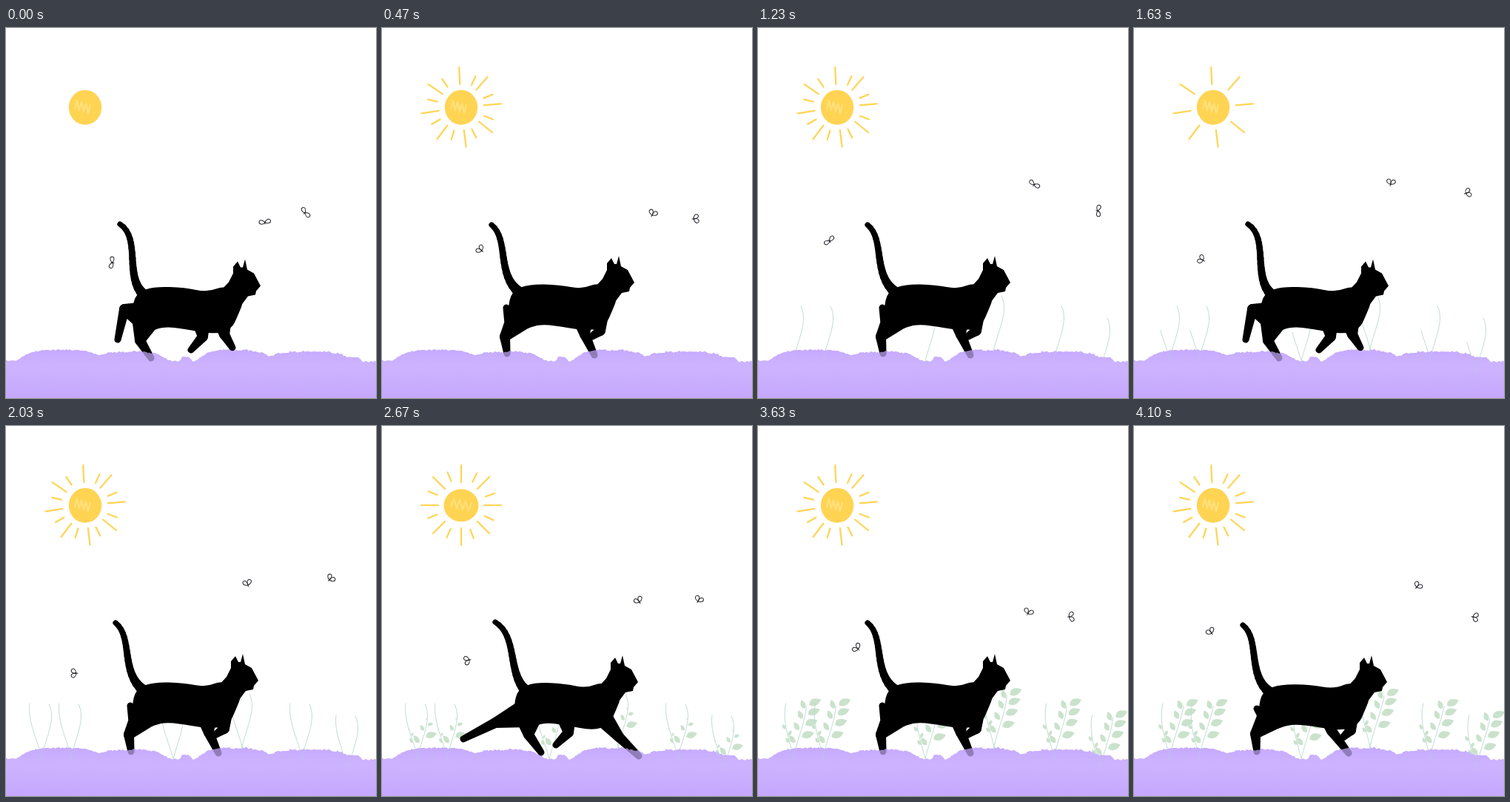
Recreate the animation shown at these times as an HTML page with a canvas. Size 500 by 500 pixels, loop 4.13 s.

```html
<!DOCTYPE html>
<html lang="en">
<head>
<meta charset="utf-8">
<title>Cat on a walk</title>
<style>
html, body { margin: 0; width: 100%; height: 100%; overflow: hidden; background: #fff; }
canvas { display: block; width: 500px; height: 500px; }
</style>
</head>
<body>
<canvas id="stage" width="500" height="500"></canvas>
<script>
const LOOP = 4130, WALK = 792, FLIGHT = 3170, GLOW = 760, FLAP = 308;
const ctx = document.getElementById('stage').getContext('2d');
const clamp = v => Math.max(0, Math.min(1, v));
const ease = v => { v = clamp(v); return v * v * (3 - 2 * v); };
const lerp = (a, b, u) => a + (b - a) * u;
const rad = d => d * Math.PI / 180;
const noise = i => { const s = Math.sin(i * 127.1) * 43758.5453; return s - Math.floor(s); };
const pick = (list, t, period) => list[Math.floor(t % period / period * list.length)];
const bezier = ([a, b, c, d], u) => [0, 1].map(i => {
  const v = 1 - u;
  return v * v * v * a[i] + 3 * v * v * u * b[i] + 3 * v * u * u * c[i] + u * u * u * d[i];
});

// ---------- sun ----------
const sunStates = ['bare', 'long', 'full', 'full', 'full', 'turned', 'full', 'full', 'turned', 'full'];

function drawRays(start, step, inner, outer) {
  for (let i = 0; i < 8; i++) {
    const a = rad(start + step * i), c = Math.cos(a), s = Math.sin(a);
    ctx.beginPath();
    ctx.moveTo(107 + c * inner, 107 + s * inner);
    ctx.lineTo(107 + c * outer, 107 + s * outer);
    ctx.stroke();
  }
}

function drawSun(t) {
  const state = pick(sunStates, t, GLOW), turned = state === 'turned';
  ctx.lineCap = ctx.lineJoin = 'round';
  ctx.fillStyle = ctx.strokeStyle = '#ffd453';
  ctx.lineWidth = 2.2;
  if (turned) {
    drawRays(-90, 45, 31, 54);
    drawRays(-64, 44.5, 35, 48);
  } else if (state !== 'bare') {
    drawRays(-93, 44, 31, 54);
    if (state === 'full') drawRays(-65, 43, 33, 46);
  }
  ctx.beginPath();
  ctx.ellipse(107, 107.3, turned ? 23.5 : 22.2, turned ? 22 : 23.5, 0, 0, 7);
  ctx.fill();
  ctx.strokeStyle = '#ffe07c';
  ctx.lineWidth = 2.2;
  ctx.beginPath();
  for (let i = 0; i < 8; i++) ctx.lineTo(93 + i * (turned ? 4 : 3), 106 + i + (i % 2 ? -9 : 3));
  ctx.stroke();
}

// ---------- ground ----------
// centre, half width and height of each mound
const mounds = [[75, 62, 15], [168, 52, 13], [243, 8, 6], [310, 53, 15], [409, 62, 13], [470, 11, 6]];

function ridge(x) {
  const rise = mounds.map(([c, w, h]) => h * (1 - ((x - c) / w) ** 4));
  return 450.5 - Math.max(0, ...rise) + (noise(x) - .5) * 2 + (noise(x >> 3) - .5) * 2;
}

function makeGround() {
  const cv = document.createElement('canvas');
  cv.width = cv.height = 500;
  const g = cv.getContext('2d');
  const fill = g.createLinearGradient(0, 434, 0, 500);
  fill.addColorStop(0, '#c6aafe');
  fill.addColorStop(.35, '#cdb3ff');
  fill.addColorStop(1, '#c5a8fd');
  g.fillStyle = fill;
  g.beginPath();
  g.moveTo(0, 500);
  for (let x = 0; x <= 500; x += 2) g.lineTo(x, ridge(x));
  g.lineTo(500, 500);
  g.fill();
  return cv;
}
const ground = makeGround();

// ---------- plants ----------
const plants = [[0, 0], [40, 0], [178, 3], [271, -14], [352, 0], [414, 16]];

function drawLeaf([x, y], angle, len) {
  ctx.save();
  ctx.translate(x, y);
  ctx.rotate(rad(angle));
  ctx.beginPath();
  ctx.moveTo(0, 0);
  ctx.lineTo(len * .2, 0);
  ctx.quadraticCurveTo(len * .45, -len * .5, len, 0);
  ctx.quadraticCurveTo(len * .55, len * .4, len * .2, 0);
  ctx.fill();
  ctx.restore();
}

function drawPlant(t) {
  const lean = ease((t - 2700) / 1300);
  const left = [[49, 451], [43, 425], [29 + 4 * lean, 400], [32 + 7 * lean, 375]];
  const right = [[47, 451], [54, 421], [68 - 4 * lean, 396], [58 + 9 * lean, 376 + 3 * lean]];
  const grow = (stem, start, time) => {
    const g = clamp((t - start) / time);
    ctx.beginPath();
    for (let k = 0; g && k <= 20; k++) ctx.lineTo(...bezier(stem, g * k / 20));
    ctx.stroke();
  };
  grow(right, 570, 620);
  grow(left, 1200, 780);
  // leaves sprout from the root up, on alternate sides
  for (let i = 0; i < 8; i++) {
    const side = i % 2, g = ease((t - 2080 - i * 100) / 620);
    if (g) drawLeaf(bezier(right, .24 + i * .107), side ? -18 - i : -130 + 3 * i, g * (side ? 22 : 16));
  }
  for (let i = 0; i < 3; i++) {
    const g = ease((t - 2150 - i * 150) / 620);
    if (g) drawLeaf(bezier(left, .28 + i * .12), i % 2 ? -65 : -125, 10 * g);
  }
}

function drawPlants(t) {
  ctx.strokeStyle = '#b9d8cc';
  ctx.fillStyle = '#cae2cc';
  ctx.lineWidth = .9;
  for (const [dx, dy] of plants) {
    ctx.save();
    ctx.translate(dx, dy);
    drawPlant(t);
    ctx.restore();
  }
}

// ---------- cat ----------
const torso = [
  [178, 354], [200, 346], [240, 347], [270, 353], [294, 343], [320, 360], [310, 385],
  [302, 402], [280, 410], [240, 403], [212, 400], [190, 409], [170, 402], [171, 370]
];
const head = [
  [288, 350], [298, 339], [304, 327], [304, 318], [310, 311], [314, 319], [317, 319], [320, 308],
  [323, 322], [332, 327], [341, 344], [335, 351], [334, 356], [324, 358], [312, 374]
];

// shifts of rump, head and tail tip; each leg is a knee and a paw
const lifted = {
  rump: [0, 3], head: [3, 4.5], tip: [6, -1], bow: 5,
  hind: [[[160, 380], [151, 421]], [[181, 422], [196, 446]]],
  fore: [[[266, 417], [250, 435]], [[295, 414], [306, 432]]]
};
const passing = {
  rump: [0, 0], head: [0, 0], tip: [0, 0], bow: 0,
  hind: [[[172, 394], [168, 378]], [[166, 417], [169, 440]]],
  fore: [[[295, 409], [282, 418]], [[274, 414], [287, 442]]]
};
const bent = {
  rump: [-2, 3], head: [1, 2], tip: [-1, 3], bow: 0,
  hind: [[[174, 392], [166, 382]], [[164, 416], [166, 440]]],
  fore: [[[293, 411], [281, 422]], [[267, 412], [290, 442]]]
};
const stride = {
  rump: [8, 0], head: [5, 2], tip: [5, -1], bow: 7,
  hind: [[[153, 401], [110, 423]], [[198, 417], [215, 441]]],
  fore: [[[252, 414], [235, 431]], [[320, 420], [347, 446]]]
};
const steps = [lifted, bent, stride, lifted, passing, bent, stride, lifted];

const add = (p, d) => [p[0] + d[0], p[1] + d[1]];
const mid = (p, q) => [(p[0] + q[0]) / 2, (p[1] + q[1]) / 2];

function drawBlob(points) {
  const last = points[points.length - 1];
  ctx.beginPath();
  ctx.moveTo(...mid(last, points[0]));
  points.forEach((p, i) => ctx.quadraticCurveTo(...p, ...mid(p, points[(i + 1) % points.length])));
  ctx.fill();
}

// tapered bar with round ends
function drawBone([x, y], r, [x2, y2], r2) {
  const a = Math.atan2(y2 - y, x2 - x);
  const b = Math.acos(Math.max(-1, Math.min(1, (r - r2) / Math.hypot(x2 - x, y2 - y))));
  ctx.beginPath();
  ctx.arc(x, y, r, a + b, a - b + 2 * Math.PI);
  ctx.arc(x2, y2, r2, a - b, a + b);
  ctx.fill();
}

function drawLeg(hip, size, [knee, paw]) {
  drawBone(hip, size, knee, 7);
  drawBone(knee, 7, paw, 4.5);
}

function drawTail({ rump, tip, bow }) {
  const curve = [
    add([148, 266], tip), add([172 + bow, 285], tip),
    add([154 + bow, 335], rump), add([187, 358], rump)
  ];
  for (let u = 0; u < 1; u += 1 / 16) {
    const v = u + 1 / 16, size = w => 3.6 + 1.8 * w + 2 * w ** 6;
    drawBone(bezier(curve, u), size(u), bezier(curve, v), size(v));
  }
}

function drawCat(t) {
  const pose = pick(steps, t, WALK);
  const shift = p => {
    const w = clamp((p[0] - 180) / 120);
    return add(p, [0, 1].map(i => lerp(pose.rump[i], pose.head[i], w)));
  };
  ctx.fillStyle = '#000';
  drawBlob(torso.map(shift));
  ctx.beginPath();
  head.forEach(p => ctx.lineTo(...shift(p)));
  ctx.fill();
  pose.hind.forEach(leg => drawLeg(add([190, 387], pose.rump), 20, leg));
  pose.fore.forEach(leg => drawLeg([Math.min(leg[0][0] - 3, 298), 393], 13, leg));
  drawTail(pose);
}

// ---------- insects ----------
const beats = [0, 470, 930, 1230, 2030, 2670];
const insects = [
  { facing: -82, path: [[350, 263], [365, 253], [382, 218], [373, 212], [327, 215], [348, 238]] },
  { facing: -22, path: [[404, 250], [421, 258], [458, 258], [459, 247], [437, 208], [427, 237]] },
  { facing: -155, path: [[144, 317], [135, 301], [105, 280], [97, 288], [95, 334], [118, 316]] }
];

// smooth closed path through the points at their beats
function flyAt(path, p) {
  const n = beats.length;
  const time = i => beats[(i + n) % n] + Math.floor(i / n) * FLIGHT;
  const point = i => path[(i + n) % n];
  let k = n - 1;
  while (beats[k] > p) k--;
  const h = time(k + 1) - time(k), u = (p - time(k)) / h;
  return [0, 1].map(j => {
    const slope = i => (point(i + 1)[j] - point(i - 1)[j]) / (time(i + 1) - time(i - 1)) * h;
    return lerp(point(k)[j], point(k + 1)[j], ease(u)) +
      slope(k) * u * (1 - u) ** 2 - slope(k + 1) * u * u * (1 - u);
  });
}

function drawInsect({ facing, path }, t) {
  const p = t % FLIGHT;
  const spread = 75 + 75 * Math.max(0, Math.cos(2 * Math.PI * t / FLAP));
  ctx.save();
  ctx.translate(...flyAt(path, p));
  ctx.rotate(rad(facing + 36 * Math.sin(2 * Math.PI * (p / FLIGHT - .05))));
  ctx.strokeStyle = '#2b2b33';
  ctx.lineWidth = 1;
  for (const side of [-1, 1]) {
    ctx.save();
    ctx.rotate(rad(side * spread / 2));
    ctx.beginPath();
    ctx.moveTo(0, 0);
    ctx.bezierCurveTo(3, -4, 7, -4, 8, -1);
    ctx.bezierCurveTo(8, 3, 4, 3, 0, 0);
    ctx.stroke();
    ctx.restore();
  }
  ctx.beginPath();
  ctx.moveTo(-2, 0);
  ctx.lineTo(2, 0);
  ctx.stroke();
  ctx.restore();
}

function frame(now) {
  const t = now % LOOP;
  ctx.fillStyle = '#fff';
  ctx.fillRect(0, 0, 500, 500);
  drawSun(t);
  ctx.drawImage(ground, 0, 0);
  drawPlants(t);
  drawCat(t);
  // a thin wash of ground over the paws and roots
  ctx.globalAlpha = .72;
  ctx.drawImage(ground, 0, 0);
  ctx.globalAlpha = 1;
  insects.forEach(insect => drawInsect(insect, t));
  requestAnimationFrame(frame);
}
frame(0);
</script>
</body>
</html>
```
